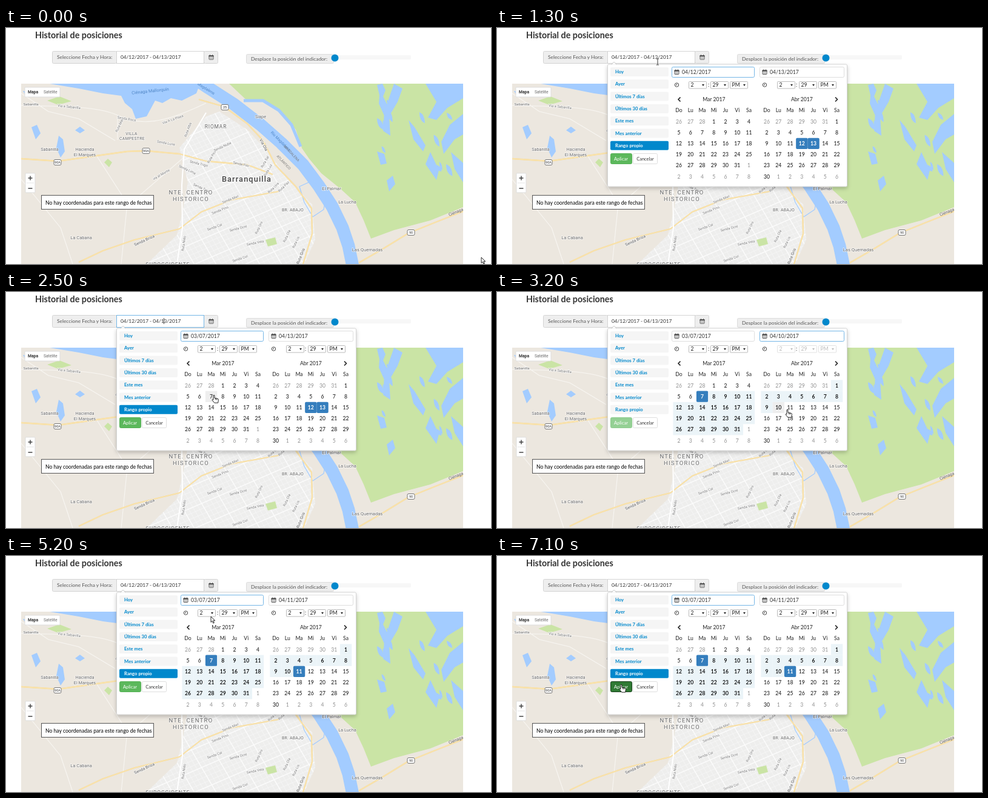
Recreate the animation shown at these times as an HTML page. Size 800 px wide and 390 px high, loop 7.2 s.

```html
<!DOCTYPE html>
<html lang="es">
<head>
<meta charset="utf-8">
<title>Historial de posiciones</title>
<style>
  html, body { margin: 0; width: 100%; height: 100%; overflow: hidden; background: #fff; }
  svg { display: block; width: 100vw; height: 100vh; font-family: Lato, sans-serif; }
  .mid { text-anchor: middle; }
  .map { font-family: Roboto, Arial, sans-serif; }
  .label { paint-order: stroke; stroke: #fff; stroke-opacity: .75; stroke-width: 1.6px; }
</style>
</head>
<body>
<svg id="stage" viewBox="0 0 800 390">
  <defs>
    <clipPath id="mapClip"><rect x="25" y="92" width="729" height="298"/></clipPath>
    <clipPath id="cityClip"><path id="city" d="M286 198L330 146 352 138 398 168 432 205 466 250 505 292 510 350 492 390H232L282 342 292 300 300 255Z"/></clipPath>
    <filter id="shadow" x="-5%" y="-5%" width="110%" height="112%">
      <feDropShadow dx="0" dy="3" stdDeviation="3" flood-opacity=".22"/>
    </filter>
  </defs>
  <g id="page"></g>
  <g id="picker"></g>
  <g id="cursor"></g>
</svg>
<script>
const LOOP = 7200, STEP = 100;
const WATER = '#a3ccff', GREEN = '#cae4a5', LAND = '#ece7df', BLUE = '#0088cc', FOCUS_RING = '#74b6e6';
const byId = id => document.getElementById(id);

const text = (s, x, y, size = 8.5, attrs = '') =>
  `<text x="${x}" y="${y + size * .35}" font-size="${size}" fill="#333" ${attrs}>${s}</text>`;
const rect = (x, y, w, h, fill, stroke = 'none', r = 0) =>
  `<rect x="${x}" y="${y}" width="${w}" height="${h}" rx="${r}" fill="${fill}" stroke="${stroke}"/>`;
const shape = (d, fill) => `<path d="${d}" fill="${fill}"/>`;
const line = (d, stroke, width = 1) =>
  `<path d="${d}" fill="none" stroke="${stroke}" stroke-width="${width}" stroke-linejoin="round"/>`;
const calendarIcon = (x, y) =>
  rect(x - 3.5, y - 3, 7, 6.5, '#fff', '#555', .5) + rect(x - 4, y - 3.5, 8, 2.4, '#555') +
  line(`M${x - 3} ${y + 1.2}h6M${x - 1.2} ${y - 1}v4M${x + 1.2} ${y - 1}v4`, '#888', .7) +
  line(`M${x - 2} ${y - 4.5}v2M${x + 2} ${y - 4.5}v2`, '#555');

function seeded(seed) {
  return () => (seed = (seed * 16807) % 2147483647) / 2147483647;
}

// ---------- map ----------
function cityStreets() {
  let minor = '', major = '';
  for (let k = -30; k < 40; k++) {
    const d = `M${230 + k * 9} 130l170 290`;
    const e = `M220 ${250 + k * 9}l300-130`;
    if (k % 4) minor += d + e; else major += d + e;
  }
  return `<g clip-path="url(#cityClip)">${line(minor, '#f6f6f6', .8)}${line(major, '#fcfcfc', 1.4)}</g>`;
}

function wetlands() {
  const random = seeded(41);
  let d = `M612 94l9-2 5 11-4 10 8 16-6 16-9-20 1-14zM640 92l14 8-8 22-14 24 2 32-12-8 2-32z
    M692 92h62v24l-26 16-18 20-14-4 14-26zM754 142l-22 18-14 28 4 20 18-24 14-8z
    M664 152l10 12 18 30-4 10-16-20zM612 204l12 4 4 16-10 2zM628 252l10-8 4 14-10 12z
    M700 205l14 30-4 16-18-26zM734 205l20 18v32l-14-22z`;
  for (let i = 0; i < 12; i++) {
    const x = 612 + random() * 135, y = 98 + random() * 130;
    const dx = 4 + random() * 7, dy = 8 + random() * 14;
    d += `M${x} ${y}q${dx} ${dy * .2} ${dx} ${dy}q${-dx} ${-dy * .2} ${-dx} ${-dy}`;
  }
  return shape(d, WATER);
}

// name, x, y, size, letter spacing
const PLACES = [
  ['Sabanilla', 41, 126, 6.2, 0], ['Sabanilla', 72, 200, 7.3, 0],
  ['Hacienda', 130, 200, 7.3, 0], ['El Marques', 130, 209, 7.3, 0],
  ['VILLA', 207, 175, 6.8, .3], ['CAMPESTRE', 208, 183, 6.8, .3],
  ['RIOMAR', 346, 163, 8.5, .8], ['Siape', 420, 146, 7.3, 0],
  ['NTE. CENTRO', 305, 272, 9.5, 1.3], ['HISTORICO', 305, 283, 9.5, 1.3],
  ['BR. ABAJO', 473, 301, 7, .2], ['El Palmar', 537, 265, 7.4, 0],
  ['La Lucha', 563, 287, 7.4, 0], ['Las Quemadas', 596, 366, 7.6, 0],
  ['La Cabana', 124, 346, 7.5, 0], ['SUROCCIDENTE', 267, 391, 8.5, 1]
];
// name, x, y, rotation
const STREETS = [
  ['Vía a Sabanilla', 104, 130, 6], ['Senda Roca', 199, 150, 10], ['Ruta Mar', 187, 161, -65],
  ['Vía A La Playa', 275, 151, -20], ['Ruta Alba', 300, 168, -70], ['Senda Luna', 264, 190, 10],
  ['Senda Trigo', 318, 224, 14], ['Senda Lima', 299, 234, 25], ['Ruta Pez', 339, 213, -60],
  ['Senda Nube', 357, 196, -25], ['Senda Flor', 388, 225, 12], ['Ruta Sal', 427, 221, -60],
  ['Ruta Luz', 432, 235, -60], ['Ruta Uva', 441, 264, -45], ['Ruta Paz', 458, 262, -45],
  ['vía al Monte', 256, 242, -30], ['Senda Teja', 322, 264, 25], ['Senda Miel', 370, 283, -22],
  ['Senda Pino', 353, 301, -22], ['Senda Cal', 344, 329, -20], ['Senda Ocre', 383, 331, -15],
  ['Ruta Nido', 293, 356, -82], ['Ruta Oro', 417, 330, -65], ['Senda Vela', 411, 355, -12],
  ['Ruta Ola', 463, 344, -65], ['Ruta Lis', 478, 354, -65], ['Senda Col', 386, 381, -18]
];
const AVENUES = [['Senda Brisa', 228, 351, -25], ['Vía Ola', 425, 193, 62], ['Ruta Gris', 486, 377, -68]];

const street = (size, attrs) => ([name, x, y, angle]) =>
  text(name, x, y, size, `class="mid label" style="fill:#777" ${attrs} transform="rotate(${angle} ${x} ${y})"`);
const shield = (s, x, y) => rect(x - 6, y - 4.5, 12, 9, '#fff', '#777', 2) + text(s, x, y, 5.5, 'class="mid"');
const tinted = (s, x, y, angle, color, size = 6.5) =>
  text(s, x, y, size, `class="mid" style="fill:${color}" transform="rotate(${angle} ${x} ${y})"`);

function map() {
  const highway = (d, w = 1.8) => line(d, '#f3d795', w + .5) + line(d, '#fae3ac', w);
  return `<g class="map" clip-path="url(#mapClip)">` + rect(25, 92, 729, 298, LAND) +
    '<use href="#city" fill="#eeeeed"/>' + cityStreets() +
    shape('M368 92H754V296L700 318 640 334 602 348 590 318 576 288 552 266 520 240 500 216 478 184 440 160Z', GREEN) +
    shape('M392 120L422 119 450 134 478 168 488 198 460 184 428 156Z', LAND) +
    line('M392 120L424 120 450 136 471 160 486 196', WATER, 5) +
    wetlands() +
    line('M312 84L334 99 376 126 420 160 454 190 490 226 516 261 538 295 555 330 565 360 572 394', WATER, 21) +
    shape('M72 92H320L314 108 290 120 272 116 258 124 246 120 232 146 214 150 208 134 196 124 190 112 160 108 120 100Z', WATER) +
    shape('M42 164l9-4 6 14-8 10zM87 178l7 6 3 20-7 10-7-16zM114 169l8-6 8 6-8 5zM28 104l14 2-8 8z', WATER) +
    shape('M162 222l6-6 7 6-5 8zM428 350l16-4 3 11-15 4zM68 120l20-7 20 8-22 6z', GREEN) +
    line('M25 128C90 130 150 128 186 145S260 158 330 124M184 148V185M25 108L70 138 120 150 180 186M205 290L300 208M25 250L90 330 110 390M150 212L200 290 190 390', '#f8f6f2', 1.1) +
    line('M484 262L506 252 528 276 524 300 506 312 492 288Z', WATER, 1.3) +
    highway('M25 216L86 220 150 211 200 204 232 203 286 208 330 220 398 226 440 242') +
    highway('M318 118L360 130 398 158 424 186 444 226 478 262 504 298 505 340 490 390') +
    highway('M120 387L160 368 212 350 286 332 322 304 372 284 450 270', 1.5) +
    highway('M582 388L620 366 664 339 706 322 754 303') +
    line('M282 390L291 330 290 260 294 200 330 140', '#fff', 2) +
    STREETS.map(street(5.8, '')).join('') +
    AVENUES.map(street(6.8, 'font-weight="500"')).join('') +
    PLACES.map(([s, x, y, size, gap]) =>
      text(s, x, y, size, `class="mid label" style="fill:#666" letter-spacing="${gap}"`)).join('') +
    text('Barranquilla', 397, 250, 12.8, 'class="mid label" style="fill:#444" font-weight="500" letter-spacing="1.1"') +
    tinted('Ciénaga Mallorquín', 238, 104, -6, '#4f86c6', 7.2) + tinted('Magdalena', 330, 100, 32, '#4f86c6') +
    tinted('Río Magdalena', 453, 187, 45, '#4f86c6') + tinted('MAGDALENA', 471, 207, 46, '#777', 5.8) +
    tinted('ATLÁNTICO', 458, 222, 46, '#777', 5.8) + tinted('Ciénaga', 742, 304, -22, '#666', 7) +
    shield('25', 361, 131) + shield('90A', 85, 222) + shield('90A', 231, 203) + shield('90', 668, 338) +
    rect(31, 98, 58, 16, '#fff', '#ddd', 1) + text('Mapa', 36, 106, 6.8, 'font-weight="700"') +
    text('Satélite', 62, 106, 6.8, 'style="fill:#666"') +
    rect(32, 240, 16, 32, '#fff', '#ddd', 1) + line('M34 256h12', '#ddd', .8) +
    line('M36.5 248h7M40 244.5v7M36.5 265h7', '#444', 1.5) + '</g>' +
    rect(58.5, 276.5, 185, 23, '#fff', '#555') +
    text('No hay coordenadas para este rango de fechas', 65, 288.5, 8.6, 'style="fill:#111" font-weight="500"');
}

byId('page').innerHTML = map() +
  text('Historial de posiciones', 48, 12, 14.3, 'font-weight="700"') +
  rect(76.5, 38.5, 106, 20, '#eee', '#d4d4d4', 2) +
  text('Seleccione Fecha y Hora:', 84, 48, 8.4, 'style="fill:#555"') +
  rect(326.5, 38.5, 23, 20, '#eee', '#d4d4d4', 2) + calendarIcon(338.5, 48.5) +
  rect(396.5, 43.5, 144, 15, '#eee', '#dcdcdc', 2) +
  text('Desplace la posición del indicador:', 404, 51, 8.4, 'style="fill:#555"') +
  rect(538, 45, 130, 7, '#f7f7f7', 'none', 2) +
  `<circle cx="542.5" cy="49.5" r="6" fill="${BLUE}"/>` +
  '<g id="dateInput"></g>';

// ---------- timeline ----------
const OPEN = 1200, FOCUS = 1400, PICK_START = 2600, PICK_END = 3500, REST = 3700, PRESS = 7100;
// time, x, y of the pointer tip
const PATH = [
  [0, 784, 379], [1100, 265, 56], [1500, 265, 56], [2200, 343, 170], [2700, 343, 170],
  [3100, 466, 192], [3200, 479, 194], [PICK_END, 484, 194], [REST, 484, 194],
  [4100, 472, 158], [4200, 473, 154], [5200, 338, 100], [6300, 338, 100],
  [6900, 205, 212], [LOOP, 205, 212]
];
function pointerAt(t) {
  const i = Math.max(1, PATH.findIndex(p => p[0] >= t));
  const [t0, x0, y0] = PATH[i - 1], [t1, x1, y1] = PATH[i];
  const u = (t - t0) / (t1 - t0);
  return [x0 + (x1 - x0) * u, y0 + (y1 - y0) * u];
}

// ---------- date picker ----------
const CELL_W = 19.25, CELL_H = 18.2, TOP = 145.4, PANEL = 145;
const RANGES = ['Hoy', 'Ayer', 'Últimos 7 días', 'Últimos 30 días', 'Este mes', 'Mes anterior', 'Rango propio'];
const day = (month, d) => new Date(2017, month - 1, d);
const cellDate = (panel, i) => day(panel + 2, 26 + i);
const pad = n => String(n).padStart(2, '0');
const format = d => `${pad(d.getMonth() + 1)}/${pad(d.getDate())}/2017`;
const inside = (x, y, x0, y0, x1, y1) => x >= x0 && x < x1 && y >= y0 && y < y1;

function dayUnder([x, y]) {
  const row = Math.floor((y - TOP) / CELL_H);
  for (const panel of [0, 1]) {
    const col = Math.floor((x - 290.4 - PANEL * panel) / CELL_W);
    if (row >= 0 && row < 6 && col >= 0 && col < 7) return cellDate(panel, row * 7 + col);
  }
  return null;
}

function month(panel, s) {
  const left = 290.4 + PANEL * panel, middle = i => left + CELL_W * (i + .5);
  let out = text(['Mar', 'Abr'][panel] + ' 2017', middle(3), 118, 8.6, 'class="mid" font-weight="500"');
  ['Do', 'Lu', 'Ma', 'Mi', 'Ju', 'Vi', 'Sa'].forEach((name, i) =>
    out += text(name, middle(i), 136, 8.6, 'class="mid" font-weight="500"'));
  for (let i = 0; i < 42; i++) {
    const date = cellDate(panel, i), off = date.getMonth() !== panel + 2;
    const x = left + CELL_W * (i % 7), y = TOP + CELL_H * Math.floor(i / 7);
    const active = !off && (+date === +s.start || +date === +s.end);
    const hovered = s.hover && +date === +s.hover;
    const inRange = date > s.start && date <= (s.end || s.hover);
    const fill = active ? '#357ebd' : hovered ? '#eee' : inRange ? '#ebf4f8' : null;
    const ink = active ? '#fff' : off ? '#909090' : inRange ? '#000' : '#222';
    const weight = active ? 700 : off ? 400 : inRange && !hovered ? 600 : 500;
    if (fill && !off) out += rect(x, y, CELL_W + .1, CELL_H + .1, fill, 'none', active ? 2 : 0);
    out += text(date.getDate(), x + CELL_W / 2, y + CELL_H / 2, 8.6,
      `class="mid" style="fill:${ink}" font-weight="${weight}"`);
  }
  return out;
}

function side(panel, value, focused, disabled) {
  const dx = PANEL * panel, ink = disabled ? '#bbb' : '#222';
  let out = rect(288.5 + dx, 64.5, panel ? 139 : 136, 17, '#fff', focused ? FOCUS_RING : '#ddd', 2) +
    calendarIcon(296.5 + dx, 73) + text(value, 305 + dx, 73, 8.6) +
    `<circle cx="${296.5 + dx}" cy="94" r="3.2" fill="none" stroke="#444"/>` +
    line(`M${296.5 + dx} 92v2.2h-1.6`, '#444', .8) + text(':', 348 + dx, 94);
  [['2', 316], ['29', 352], ['PM', 384]].forEach(([label, x]) => {
    x += dx + (panel ? 1 : 0);
    out += rect(x + .5, 88.5, 29, 11.5, '#fff', disabled ? '#e2e2e2' : '#bbb', 1) +
      text(label, x + 3.5, 94, 8.6, `style="fill:${ink}"`) + shape(`M${x + 22} 93h4l-2 3z`, ink);
  });
  return out;
}

function picker(s, t) {
  const selecting = !s.end, pressed = t >= PRESS;
  let out = `<g filter="url(#shadow)">${rect(182.5, 60, 395, 202, '#fff', '#d4d4d4', 2)}</g>` +
    line('M189 60l4-4 4 4', '#ccc') + shape('M189.5 60.6l3.5-3.6 3.5 3.6z', '#fff');
  RANGES.forEach((name, i) => {
    const y = 72.5 + 20.3 * i, on = i === 6 && !selecting;
    out += rect(187, y - 7.5, 96, 15, on ? BLUE : '#f5f5f5', 'none', 2) +
      text(name, 195, y, 7.7, `font-weight="700" style="fill:${on ? '#fff' : BLUE}"`);
  });
  const shownStart = s.hover && !selecting ? s.hover : s.start;
  const shownEnd = s.end || s.hover || s.start;
  out += side(0, format(shownStart), !selecting, false) + side(1, format(shownEnd), selecting, selecting) +
    month(0, s) + month(1, s) + line('M302.5 114.5l-3.5 3.5 3.5 3.5M558 114.5l3.5 3.5-3.5 3.5', '#222', 1.7);
  const green = pressed ? ['#2f7a34', '#173f1a'] : ['#5cb85c', '#56b256'];
  return out +
    `<g opacity="${selecting ? .65 : 1}">${rect(187.5, 207.5, 35, 17, green[0], green[1], 2)}` +
    text('Aplicar', 204.5, 216, 7.5, 'class="mid" style="fill:#fff"') + '</g>' +
    rect(224.5, 207.5, 40, 17, '#fff', '#ddd', 2) + text('Cancelar', 244.5, 216, 7.5, 'class="mid"');
}

function cursor([x, y], open) {
  const overHand = open && (dayUnder([x, y]) || inside(x, y, 187, 207, 265, 225) || inside(x, y, 187, 65, 283, 202));
  const art = inside(x, y, 182, 38, 327, 60)
    ? line('M-2-5h1.5q.5 0 .5 1v8q0 1-.5 1H-2M2-5H.5M2 5H.5', '#222', .9)
    : `<path fill="#fff" stroke="#111" stroke-width=".9" stroke-linejoin="round" d="${overHand
      ? 'M-1 1q1-1.6 2 0v4.2l5 1q1.5.4 1.4 2l-.7 5H.8L-3 8.5q0-1.6 2-.4zM2.6 5.8v2.4M4.6 6.2v2.2'
      : 'M0 0v9.4l2.2-2 1.6 3.7 1.6-.7-1.6-3.6h3z'}"/>`;
  return `<g transform="translate(${x} ${y})">${art}</g>`;
}

function draw(t) {
  const open = t >= OPEN, focused = t >= FOCUS && t < PICK_START;
  const state = {
    start: t < PICK_START ? day(4, 12) : day(3, 7),
    end: t < PICK_START ? day(4, 13) : t < PICK_END ? null : day(4, 11),
    // the page reacts one step after the pointer
    hover: open ? dayUnder(pointerAt(Math.max(0, t - STEP))) : null
  };
  byId('dateInput').innerHTML =
    rect(182.5, 38.5, 144, 20, '#fff', focused ? FOCUS_RING : '#d4d4d4') +
    text('04/12/2017 - 04/13/2017', 189, 48, 8.3) + (focused ? line('M260.5 43v10', '#222', .8) : '');
  byId('picker').innerHTML = open ? picker(state, t) : '';
  byId('cursor').innerHTML = cursor(pointerAt(t), open);
}

const began = performance.now();
let shown = -1;
function tick() {
  const t = Math.floor(((performance.now() - began) % LOOP) / STEP) * STEP;
  if (t !== shown) draw(shown = t);
  requestAnimationFrame(tick);
}
tick();
</script>
</body>
</html>
```
